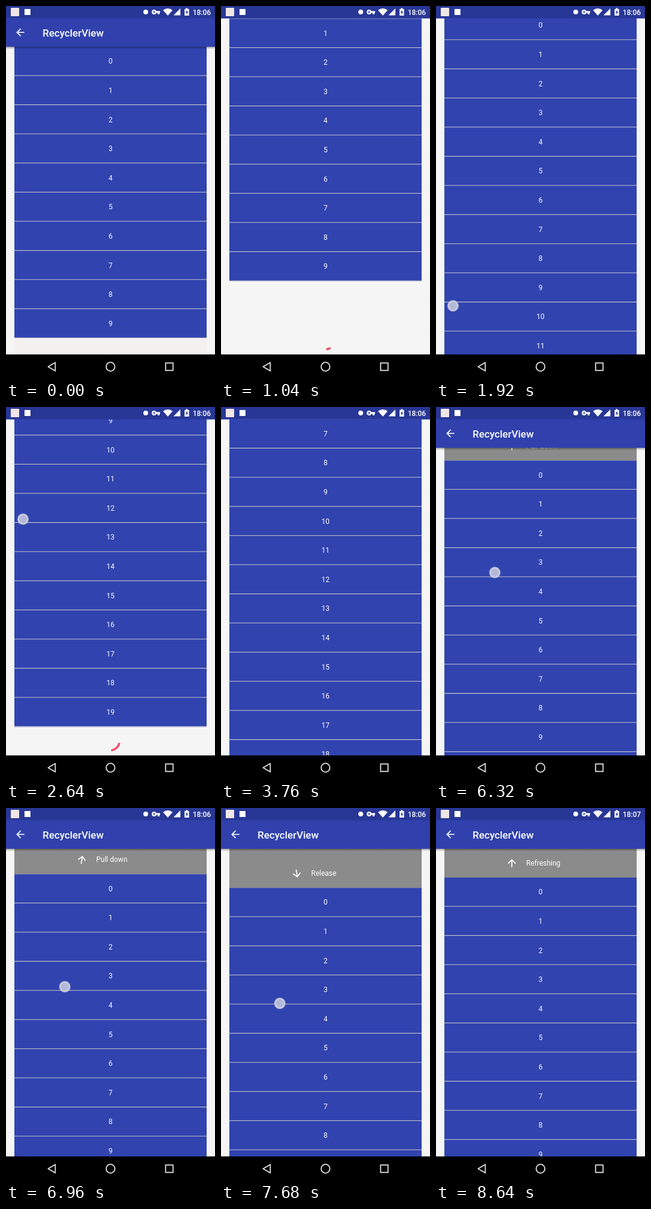
Recreate the animation shown at these times as an HTML page. Size 350 by 622 pixels, loop 8720 ms.

```html
<!DOCTYPE html>
<html lang="en">
<head>
<meta charset="utf-8">
<title>RecyclerView</title>
<style>
  html, body { margin: 0; width: 100%; height: 100%; overflow: hidden; background: #f5f5f5; }
  svg { display: block; width: 100%; height: 100%; }
  text { font-family: Roboto, sans-serif; font-size: 12px; fill: #fff; }
  .row rect { fill: #3143af; }
  .row path { stroke: #cdcdcd; }
  .row text { text-anchor: middle; }
  .title { font-size: 17px; font-weight: 500; }
  .clock { font-weight: 500; }
  .white { fill: #fff; }
  .nav { fill: none; stroke: #e2e2e2; stroke-width: 1.8; }
</style>
</head>
<body>
<svg viewBox="0 0 350 622">
  <defs>
    <path id="arrow" d="M8-1H-4.17l5.59-5.59L0-8l-8 8 8 8 1.41-1.41L-4.17 1H8z" transform="scale(.851)"/>
    <linearGradient id="shade" x2="0" y2="1">
      <stop stop-opacity=".35"/><stop offset="1" stop-opacity="0"/>
    </linearGradient>
    <radialGradient id="glow">
      <stop offset=".55" stop-color="#b4b8d8"/>
      <stop offset=".8" stop-color="#d3d5e4"/>
      <stop offset="1" stop-color="#c5c8dd" stop-opacity=".25"/>
    </radialGradient>
  </defs>
  <rect width="350" height="622" fill="#f5f5f5"/>
  <rect id="tint" x="14" y="553" width="322" height="28" fill="#f4f0f0"/>
  <path id="spinner" fill="none" stroke="#f04f6e" stroke-width="3.4"/>

  <g id="list">
    <rect x="14" y="-32" width="322" height="100" fill="#8b8b8b"/>
    <g id="pull"><use href="#arrow" class="white" transform="rotate(90)"/></g>
    <text id="hint" x="151" y="48"></text>
  </g>

  <g id="toolbar">
    <rect id="shadow" y="68" width="350" height="4" fill="url(#shade)"/>
    <rect y="20" width="350" height="48" fill="#3041ad"/>
    <use href="#arrow" class="white" x="0" y="0" transform="translate(24 44)"/>
    <text class="title" x="61.3" y="50.5">RecyclerView</text>
  </g>

  <circle id="touch" r="10" fill="url(#glow)"/>

  <rect width="350" height="20.4" fill="#283796"/>
  <rect x="8" y="3" width="14" height="14" rx="1" fill="#f1e6e6"/>
  <g class="white">
    <rect x="31" y="5" width="10" height="10"/>
    <circle cx="234" cy="10" r="4"/>
    <path fill-rule="evenodd" d="M248 6a4 4 0 1 0 3.8 5.4H254V14h3v-2.600H258V8.600H251.800A4 4 0 0 0 248 6zm0 2.600a1.400 1.400 0 1 1 0 2.800 1.400 1.400 0 0 1 0-2.800z"/>
    <path d="M263 7Q271 1 279 7L271 16z"/>
    <path d="M292 4V15.500H280.500z"/>
    <path fill-rule="evenodd" d="M299 5h2.200V3.500h3V5h2.300V16H299zM303.500 6.500L300.700 11H302.400V14.500L305 9.800H303.500z"/>
  </g>
  <text id="clock" class="clock" x="312.700" y="14.500"></text>

  <rect y="581" width="350" height="41"/>
  <g class="nav">
    <path d="M82.500 594.500V608.500L70.500 601.500z" stroke-linejoin="round"/>
    <circle cx="175" cy="601.500" r="7.300"/>
    <rect x="267.300" y="595.300" width="12.400" height="12.400"/>
  </g>
</svg>
<script>
  const LOOP = 8720, STEP = 80, PITCH = 48.6, BAR = 47.4;
  const $ = id => document.getElementById(id);
  const set = (el, attrs) => {
    for (const key in attrs) el.setAttribute(key, attrs[key]);
  };
  const show = (el, on) => el.style.display = on ? '' : 'none';
  const clamp = (v, lo = 0, hi = 1) => Math.min(hi, Math.max(lo, v));

  const linear = p => p;
  const easeOut = p => 1 - (1 - p) ** 2;
  const smooth = p => (1 - Math.cos(Math.PI * p)) / 2;

  // Keys are [time, value, easing into this key].
  function track(keys, t) {
    const i = keys.findIndex(k => k[0] > t);
    if (i < 0) return keys[keys.length - 1][1];
    if (i === 0) return keys[0][1];
    const [t0, v0] = keys[i - 1], [t1, v1, ease = linear] = keys[i];
    return v0 + (v1 - v0) * ease((t - t0) / (t1 - t0));
  }

  // Positive hides the toolbar and scrolls, negative pulls the header out.
  const scrollKeys = [
    [0, 0], [560, 0], [1040, 95.2, easeOut], [1519, 95.2], [1520, BAR],
    [1840, BAR], [2600, 506.6, smooth], [3279, 506.6], [3280, 458.6],
    [3520, 458.6], [4400, BAR, smooth], [4720, 0, easeOut],
    [5680, 0], [6320, -21.3], [6960, -42.4], [7440, -58], [7840, -70],
    [8240, -48, easeOut]
  ];
  const swipeKeys = [[1920, 500], [2600, 187, smooth]];
  const dragKeys = [[5680, 244], [6320, 276], [6960, 298], [7840, 332]];
  const loads = [
    { from: 980, to: 1520, base: 40 },
    { from: 2440, to: 3280, base: -44 }
  ];

  const rows = Array.from({ length: 30 }, (_, i) => {
    const g = document.createElementNS('http://www.w3.org/2000/svg', 'g');
    const y = 68 + i * PITCH;
    g.setAttribute('class', 'row');
    g.innerHTML = `<rect x="14" y="${y}" width="322" height="${PITCH}"/>
      <path d="M14 ${y + 48}h322"/><text x="175" y="${y + 28.3}">${i}</text>`;
    return $('list').appendChild(g);
  });

  function drawSpinner(t) {
    const load = loads.find(l => t >= l.from && t < l.to);
    show($('spinner'), load);
    if (!load) return;
    const u = t - load.from;
    const grow = smooth(clamp(u / 667)), shrink = smooth(clamp((u - 667) / 667));
    const start = load.base + u * .27 + 250 * shrink;
    const span = 24 + 250 * (grow - shrink);
    const at = deg => {
      const a = deg * Math.PI / 180;
      return `${175 + 15 * Math.cos(a)} ${557.5 + 15 * Math.sin(a)}`;
    };
    set($('spinner'), { d: `M${at(start)}A15 15 0 ${+(span > 180)} 1 ${at(start + span)}` });
  }

  function drawTouch(t) {
    const swiping = t >= 1920 && t <= 2640;
    const dragging = t >= 5600 && t < 7920;
    show($('touch'), swiping || dragging);
    set($('touch'), {
      cx: swiping ? 28.5 : 98.5,
      cy: track(swiping ? swipeKeys : dragKeys, t)
    });
  }

  function draw(t) {
    const scroll = track(scrollKeys, t), pull = -scroll;
    const count = t < 1520 ? 10 : t < 3280 ? 20 : 30;
    rows.forEach((row, i) => show(row, i < count));
    set($('list'), { transform: `translate(0 ${pull})` });
    set($('toolbar'), { transform: `translate(0 ${-clamp(scroll, 0, BAR)})` });
    show($('shadow'), scroll < BAR);
    show($('tint'), t < 640);

    const turn = t < 7840 ? clamp((pull - 41) * 7, 0, 180)
      : 180 * (1 - smooth(clamp((t - 8320) / 320)));
    set($('pull'), { transform: `translate(127 44) rotate(${turn})` });
    $('hint').textContent = t >= 8400 ? 'Refreshing' : pull > 48 || t > 7840 ? 'Release' : 'Pull down';
    $('clock').textContent = t < 8400 ? '18:06' : '18:07';
    drawSpinner(t);
    drawTouch(t);
  }

  const origin = performance.now();
  function tick() {
    const t = (performance.now() - origin) % LOOP;
    draw(Math.floor(t / STEP) * STEP);
    requestAnimationFrame(tick);
  }
  tick();
</script>
</body>
</html>
```
